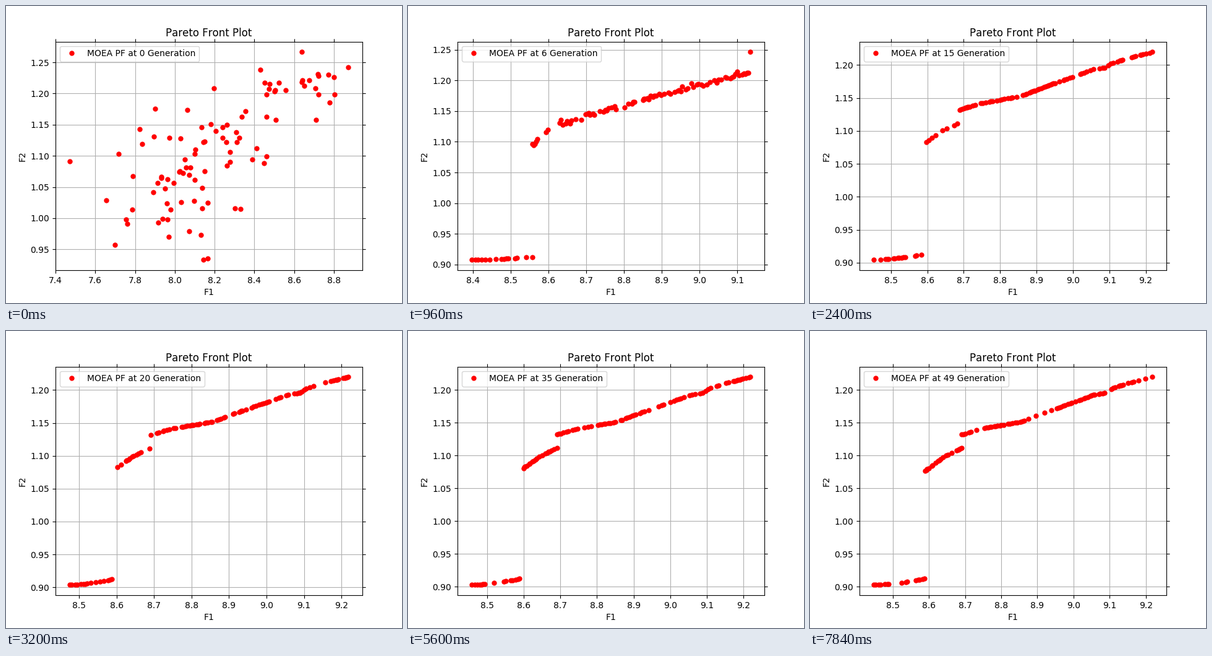
Animation of 640x480 px, one loop 8 s. Source, as a matplotlib script:

```python
import numpy as np
import matplotlib.pyplot as plt
from matplotlib.animation import FuncAnimation

GENERATIONS = 50
INTERVAL = 160
SIZE = 98      # population
FORMED = 6     # generation at which the cloud has become a front
SETTLED = 28   # generation at which the front stops changing shape

# How the ends of the three branches drift over the generations.
KEYS = [6, 10, 20, 28, 41, 49]
X_MIN = [8.396, 8.4295, 8.4744, 8.463, 8.453, 8.4464]
Y_MIN = [0.9075, 0.9046, 0.9035, 0.9028, 0.9027, 0.9027]
X_MAX = [9.1345, 9.2185]
Y_MAX = [1.2462, 1.2198]
LOW_END = [8.5565, 8.58, 8.588]
MID_START = [8.5565, 8.592, 8.603, 8.605, 8.595, 8.589]
MID_END = [8.598, 8.678, 8.688, 8.691]
TOP_START = [8.629, 8.6885, 8.691]
MID_COUNT = [7, 3, 12, 19]
LOW_COUNT = 15

# Bends of the middle and top branches, young and settled.
MID_YOUNG = [(8.5565, 1.0938), (8.598, 1.123), (8.68, 1.13)]
MID_OLD = [(8.59, 1.077), (8.642, 1.0985), (8.691, 1.1118)]
TOP_YOUNG = [(8.629, 1.131), (9.05, 1.2014), (9.2185, 1.222)]
TOP_OLD = [(8.691, 1.132), (8.753, 1.142), (8.854, 1.1514), (8.93, 1.1675),
           (9.06, 1.1935), (9.09, 1.1957), (9.106, 1.2022), (9.15, 1.2105),
           (9.2185, 1.2198)]


def key(gen, values):
    return float(np.interp(gen, KEYS[:len(values)], values))


def bend(x, knots):
    return np.interp(x, *zip(*knots))


def spread(rng, start, end, n):
    """Unevenly spaced values that include both ends."""
    steps = np.cumsum(0.5 + rng.exponential(size=n - 1))
    return start + (end - start) * np.append(0, steps / steps[-1])


def front(gen):
    rng = np.random.default_rng(gen)
    age = min(1, (gen - FORMED) / (SETTLED - FORMED))
    youth = (1 - age) ** 5
    y_min, y_max = key(gen, Y_MIN), key(gen, Y_MAX)

    def branch(start, end, n, young, old):
        x = spread(rng, start, end, n)
        y = youth * bend(x, young) + (1 - youth) * bend(x, old)
        y += 0.0022 * youth * rng.normal(size=n)
        return x, np.minimum(y, y_max)

    low_x = spread(rng, key(gen, X_MIN), key(gen, LOW_END), LOW_COUNT)
    u = (low_x - low_x[0]) / (low_x[-1] - low_x[0])
    low = low_x, y_min + (0.9122 - y_min) * u ** 1.6

    n_mid = round(key(gen, MID_COUNT))
    mid = branch(key(gen, MID_START), key(gen, MID_END), n_mid,
                 MID_YOUNG, MID_OLD)
    top = branch(key(gen, TOP_START), key(gen, X_MAX),
                 SIZE - LOW_COUNT - n_mid, TOP_YOUNG, TOP_OLD)
    top[1][-1] = y_max
    return np.hstack([low, mid, top])


def cloud():
    """Random start: a wide blob, an arc to its right and four extremes."""
    rng = np.random.default_rng(4)
    blob_x = np.clip(rng.normal(8.1, 0.21, 72), 7.5, 8.46)
    blob_y = rng.normal(1.075 + 0.09 * (blob_x - 8.1), 0.055)
    arc_x = rng.uniform(8.3, 8.84, 22)
    arc_y = rng.normal(1.205 - 0.25 * np.maximum(0, 8.45 - arc_x), 0.016)
    x = np.hstack([blob_x, arc_x, 7.47, 8.143, 8.639, 8.873])
    y = np.hstack([blob_y, arc_y, 1.0915, 0.933, 1.2665, 1.2423])
    y = np.clip(y, 0.933, 1.2665)

    # Lowest points feed the low branch, the others run left to right.
    order = np.argsort(y)
    low, rest = order[:LOW_COUNT], order[LOW_COUNT:]
    order = np.hstack([low[np.argsort(x[low])], rest[np.argsort(x[rest])]])
    return np.array([x[order], y[order]])


def population(gen):
    if gen >= FORMED:
        return front(gen)
    left = (1 - gen / FORMED) ** 2
    return left * cloud() + (1 - left) * front(FORMED)


plt.rcParams["text.kerning_factor"] = 6
fig, ax = plt.subplots(figsize=(6.4, 4.8), dpi=100)


def draw(gen):
    ax.clear()
    x, y = population(gen)
    ax.plot(x, y, "o", color="red", markersize=5,
            label=f"MOEA PF at {gen} Generation")
    ax.set_title("Pareto Front Plot")
    ax.set_xlabel("F1")
    ax.set_ylabel("F2")
    ax.tick_params(top=True, right=True)
    ax.grid(True)
    ax.legend(loc="upper left")


anim = FuncAnimation(fig, draw, frames=GENERATIONS, interval=INTERVAL,
                     init_func=lambda: None, repeat=True)
plt.show()
```
